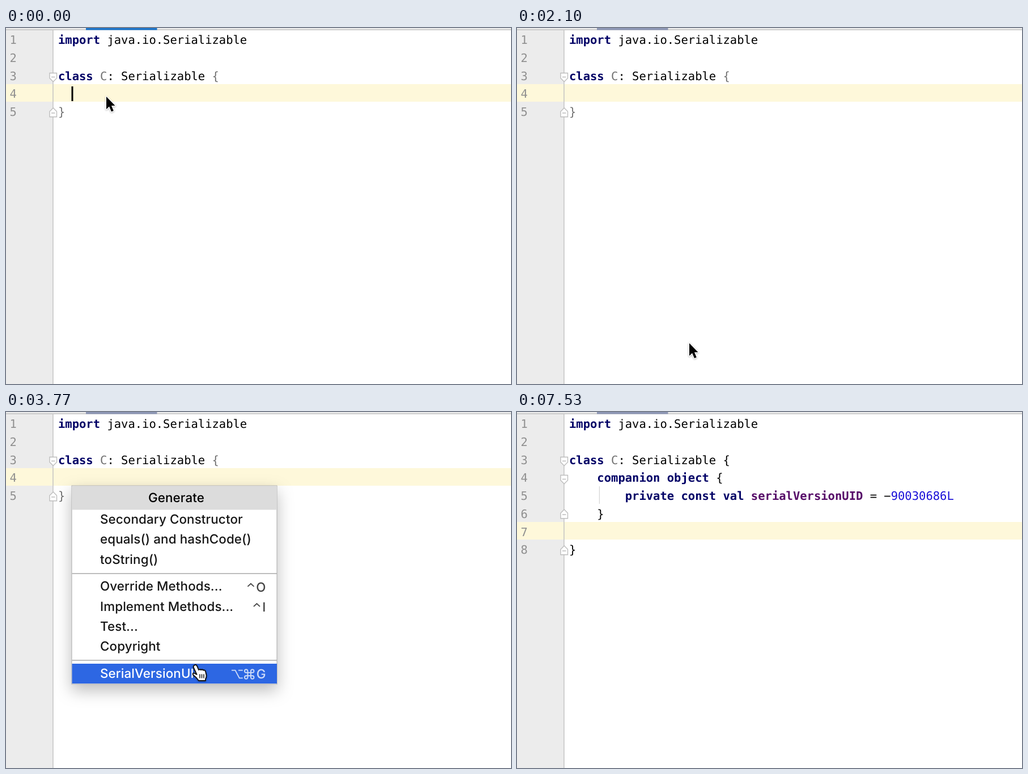
An HTML page for the animation above (7.56 s loop, 891 by 628 pixels).

```html
<!DOCTYPE html>
<html lang="en">
<head>
<meta charset="utf-8">
<title>Generate serialVersionUID</title>
<style>
  html, body { margin: 0; width: 100%; height: 100%; overflow: hidden; background: #fff; }
  svg { display: block; width: 891px; height: 628px; }
  text { white-space: pre; text-rendering: geometricPrecision; }
  .code text { font: 20.5px "DejaVu Sans Mono", monospace; fill: #000; }
  .code .kw { font-weight: bold; fill: #000066; }
  .code .prop { font-weight: bold; fill: #560b68; }
  .code .num { fill: #1a10d8; }
  .code .dim { fill: #707070; }
  .code .line { fill: #8f8f8f; }
  .fold { fill: #fff; stroke: #bdbdbd; stroke-width: 1.4; }
  .panel { font-family: Inter, "Open Sans", sans-serif; font-weight: 500; }
  .panel .back { stroke: #a9a9a9; stroke-width: 1; filter: drop-shadow(0 11px 14px rgba(0, 0, 0, .26)); }
  .menu { font-size: 24px; }
  .popup { font-size: 22.4px; letter-spacing: .1px; }
  .row text { fill: #161616; }
  .row .bar { fill: none; }
  .row .keys { color: #454545; }
  .row .keys text { fill: currentColor; }
  .row .keys path { fill: none; stroke: currentColor; stroke-width: 2; }
  .row .arrow { fill: #444; }
  .row.on .bar { fill: #2d67e3; }
  .row.on text, .row.on .arrow { fill: #fff; }
  .row.on .keys { color: #fff; }
  .popup .row.on .keys { color: #cfdcf8; }
  .row.on .keys text { fill: currentColor; }
  #mouse { filter: drop-shadow(0 1px 1.5px rgba(0, 0, 0, .3)); }
</style>
</head>
<body>
<svg viewBox="0 0 891 628" id="stage"></svg>
<script>
const LOOP = 7560;
const MENU_OPEN = 950, MENU_FADE = 1850, MENU_GONE = 2000;
const POPUP_OPEN = 2170, POPUP_GONE = 4050, INSERTED = 4200, BLUR = 5700;
const PITCH = 31.75, COL = 12.341;

const rect = (x, y, w, h, fill, extra = '') =>
  `<rect x="${x}" y="${y}" width="${w}" height="${h}" fill="${fill}" ${extra}/>`;
// Baselines sit on whole pixels
const text = (x, y, s, cls = '', anchor = 'start') =>
  `<text x="${x}" y="${Math.round(y)}" class="${cls}" text-anchor="${anchor}">${s}</text>`;
const lineTop = n => Math.round((n - 1) * PITCH + 3.5);
const baseline = n => 28 + (n - 1) * PITCH;

// Editor
const code = (line, col, s, cls) => text(92 + col * COL, baseline(line), s, cls);
const numbers = n => Array.from({ length: n }, (_, i) =>
  text(6.5, baseline(i + 1), i + 1, 'line')).join('');
const foldStart = n => {
  const y = lineTop(n) + 12.5;
  return `<path class="fold" d="M77 ${y}h12.5v9l-6.2 6.2l-6.3-6.2zM80 ${y + 7}h6.5"/>`;
};
const foldEnd = n => {
  const y = lineTop(n) + 10;
  return `<path class="fold" d="M83.3 ${y}l6.2 6.2v9.6h-12.5v-9.6zM80 ${y + 9}h6.5"/>`;
};
const row = n => rect(0, lineTop(n), 891, 31, '#fef8da');
const gutter = rect(82.2, 4, 1.5, 624, '#c3c3c3');
const header = brace =>
  code(1, 0, 'import', 'kw') + code(1, 7, 'java.io.Serializable') +
  code(3, 0, 'class', 'kw') + code(3, 6, 'C', 'dim') + code(3, 7, ': Serializable') +
  code(3, 22, '{', brace) + foldStart(3);

const before = row(4) + gutter + numbers(5) + header('dim') + code(5, 0, '}', 'dim') + foldEnd(5);
const after = row(7) + gutter + numbers(8) + header('') + foldStart(4) +
  code(4, 4, 'companion object', 'kw') + code(4, 21, '{') +
  rect(144.8, 131, 1.3, 31, '#d6d6d6') +
  code(5, 8, 'private const val', 'kw') + code(5, 26, 'serialVersionUID', 'prop') +
  code(5, 43, '= −') + code(5, 46, '90030686L', 'num') +
  code(6, 4, '}') + foldEnd(6) + code(8, 0, '}') + foldEnd(8);

// Shortcut symbols, each about 20 by 20 with its middle at y = 10
const SYMBOLS = {
  '⌥': 'M0 2.5h7l8 15h6.5M13 2.5h8.5',
  '⇧': 'M10.5 1.5L20 10.5H15V18H6V10.5H1Z',
  '⌘': 'M7 7V4a3 3 0 1 0-3 3h12a3 3 0 1 0-3-3v12a3 3 0 1 0 3-3H4a3 3 0 1 0 3 3Z',
  '⏎': 'M21.5 0h-6l-1 9.5h-5l.5-5L0 12l8 7.5l.5-5h11.5z',
  '⌃': 'M7 8.5l6-5.5l6 5.5'
};

function keys(s, right, y, step, scale) {
  let x = right, out = '';
  for (const c of [...s].reverse()) {
    if (SYMBOLS[c]) {
      x -= step;
      out += `<path transform="translate(${x + 1} ${y - 10 * scale}) scale(${scale})" d="${SYMBOLS[c]}"/>`;
    } else {
      out += text(x, y + 8.5 * scale, c, '', 'end');
      x -= c === 'I' ? 7 : 17.5;
    }
  }
  return `<g class="keys">${out}</g>`;
}

// Rows are [middle, label, shortcut]; '>' marks a submenu
const menuRows = [
  [145, 'Show Context Actions', '⌥⏎'],
  [199.8, 'Copy Reference', '⌥⇧⌘C'],
  [233.3, 'Paste', '⌘V'],
  [266.8, 'Paste from History...', '⇧⌘V'],
  [300.3, 'Paste without Formatting', '⌥⇧⌘V'],
  [334, 'Column Selection Mode', '⇧⌘8'],
  [388.8, 'Refactor', '>'],
  [443.3, 'Folding', '>'],
  [477, 'Analyze', '>'],
  [531.5, 'Go To', '>'],
  [565, 'Generate...', '⌘N'],
  [619.5, 'Reveal in Viewer', '']
];
const popupRows = [
  [190, 'Secondary Constructor', ''],
  [225.2, 'equals() and hashCode()', ''],
  [260.4, 'toString()', ''],
  [308.2, 'Override Methods...', '⌃O'],
  [343.5, 'Implement Methods...', '⌃I'],
  [378.8, 'Test...', ''],
  [414, 'Copyright', ''],
  [461.5, 'SerialVersionUID', '⌥⌘G']
];

const menuRow = ([y, label, key]) => `<g class="row">
  <rect class="bar" x="174.5" y="${y - 16}" width="513.5" height="33"/>
  ${text(222, y + 7.9, label)}
  ${key === '>' ? `<path class="arrow" d="M654 ${y - 7.5}l15 7.5l-15 7.5z"/>` : keys(key, 656, y - .6, 24.5, 1)}</g>`;
const popupRow = ([y, label, key]) => `<g class="row">
  <rect class="bar" x="116.5" y="${y - 17.5}" width="361.5" height="35"/>
  ${text(166, y + 7.2, label)}${keys(key, 458.5, y + 1, 22, .92)}</g>`;

const bulb = `<path fill="#5a5a5a" d="M199.5 130.500a9.2 9.2 0 0 1 5 16.8v2.2h-10v-2.2a9.2 9.2 0 0 1 5-16.8z
  M194.5 151h10v2h-10zM196.5 154.500h6v2h-6z"/>`;
const clipboard = `<path fill="none" stroke="#5a5a5a" stroke-width="2.4" d="M192 223h15.500v19h-15.500z"/>` +
  rect(195, 219.5, 9.5, 7.5, '#5a5a5a');

const menu = rect(174.5, 121.5, 513.5, 520, '#f3f3f3', 'class="back"') +
  [173, 362, 416.3, 504.5, 592.5].map(y => rect(175, y - 1.5, 512.5, 3, '#d7d7d7')).join('') +
  menuRows.map(menuRow).join('') + bulb + clipboard;
const popup = rect(116, 130, 362, 350, '#fff', 'class="back"') +
  rect(116.5, 130.5, 361.5, 42, '#dcdcdc') +
  text(300.5, 159, 'Generate', '', 'middle') +
  [285, 438].map(y => rect(116.5, y - .8, 361.5, 1.6, '#adadad')).join('') +
  popupRows.map(popupRow).join('');

const arrow = `<path id="arrow" stroke="#fff" stroke-width="2.6" paint-order="stroke" stroke-linejoin="round"
  d="M0 0V22.200L5.100 17.400L9 26.500L12.800 24.900L9 16H15.500Z"/>`;
const hand = `<g id="hand" transform="translate(-5 -1)" stroke="#111" stroke-linejoin="round" stroke-linecap="round">
  <path fill="#fff" stroke-width="1.9" d="M4 2Q7-.5 9 3L12 10Q14 8 16 10Q18 8.500 20 10.500Q23 9.500 24 12.500
    L25.500 19Q26 23 24 26V29H12Q9 24 3 19.500Q0 16 3.500 15.500L8.500 18L3 6Q2 3.500 4 2Z"/>
  <path stroke-width="1.5" d="M14 18v6M17.500 18v6M21 18v6"/></g>`;

document.getElementById('stage').innerHTML =
  rect(0, 0, 891, 628, '#fff') + rect(0, 0, 82.5, 628, '#ececec') +
  rect(0, 0, 891, 3, '#ececec') + rect(0, 2.5, 891, 1.3, '#bcbcbc') +
  rect(141, 0, 125.5, 3.6, '#1d74c9', 'id="tab"') +
  `<g class="code" id="before">${before}</g><g class="code" id="after">${after}</g>` +
  rect(0, 0, 3, 26, '#000', 'id="caret"') +
  `<g class="panel menu" id="menu">${menu}</g><g class="panel popup" id="popup">${popup}</g>` +
  `<g id="mouse">${arrow}${hand}</g>`;

const el = Object.fromEntries([...document.querySelectorAll('[id]')].map(e => [e.id, e]));
const menuEls = el.menu.querySelectorAll('.row');
const popupEls = el.popup.querySelectorAll('.row');

// Motion
const easeIn = p => p * p;
const easeOut = p => p * (2 - p);
const smooth = p => p * p * (3 - 2 * p);
const path = [
  [0, 177, 121], [950, 177, 121], [1300, 270, 369, easeIn], [1620, 304, 556, easeOut],
  [2200, 304, 556], [2750, 344, 341, smooth], [3150, 344, 341],
  [3650, 333, 446, smooth], [4650, 333, 446], [5150, 345, 650, smooth], [LOOP, 345, 650]
];

function mouseAt(t) {
  const i = path.findIndex(p => p[0] > t);
  const [t0, x0, y0] = path[i - 1], [t1, x1, y1, ease = smooth] = path[i];
  const p = ease((t - t0) / (t1 - t0));
  return [x0 + (x1 - x0) * p, y0 + (y1 - y0) * p];
}

// The last row touched stays lit while the pointer is on a separator
function hovered(rows, half, t, since, first) {
  for (let s = t; s >= since; s -= 10) {
    const y = mouseAt(s)[1];
    const i = rows.findIndex(r => Math.abs(y - r[0]) <= half);
    if (i >= 0) return i;
  }
  return first;
}

const show = (e, on) => e.style.display = on ? '' : 'none';
const light = (els, n) => els.forEach((e, i) => e.classList.toggle('on', i === n));

function draw(t) {
  const done = t >= INSERTED;
  const focused = t < MENU_OPEN || (t >= POPUP_GONE && t < BLUR);
  const popupOpen = t >= POPUP_OPEN && t < POPUP_GONE;
  const [x, y] = mouseAt(t);

  show(el.before, !done);
  show(el.after, done);
  el.tab.setAttribute('fill', focused ? '#1d74c9' : '#8d97b5');

  const blinkStart = done ? INSERTED : t < MENU_OPEN ? 0 : POPUP_GONE;
  show(el.caret, focused && Math.floor((t - blinkStart) / 500) % 2 === 0);
  el.caret.setAttribute('x', done ? 92 : 115.5);
  el.caret.setAttribute('y', lineTop(done ? 7 : 4) + 4);

  show(el.menu, t >= MENU_OPEN && t < MENU_GONE);
  el.menu.style.opacity = Math.min(1, Math.max(0, (MENU_GONE - t) / (MENU_GONE - MENU_FADE)));
  light(menuEls, hovered(menuRows, 16.7, t, MENU_OPEN, -1));

  show(el.popup, popupOpen);
  light(popupEls, hovered(popupRows, 17.6, t, POPUP_OPEN, 0));

  const pointing = popupOpen && y < 480;
  show(el.arrow, !pointing);
  show(el.hand, pointing);
  el.mouse.setAttribute('transform', `translate(${x.toFixed(2)} ${y.toFixed(2)})`);
}

const start = performance.now();
function tick() {
  draw((performance.now() - start) % LOOP);
  requestAnimationFrame(tick);
}
tick();
</script>
</body>
</html>
```
